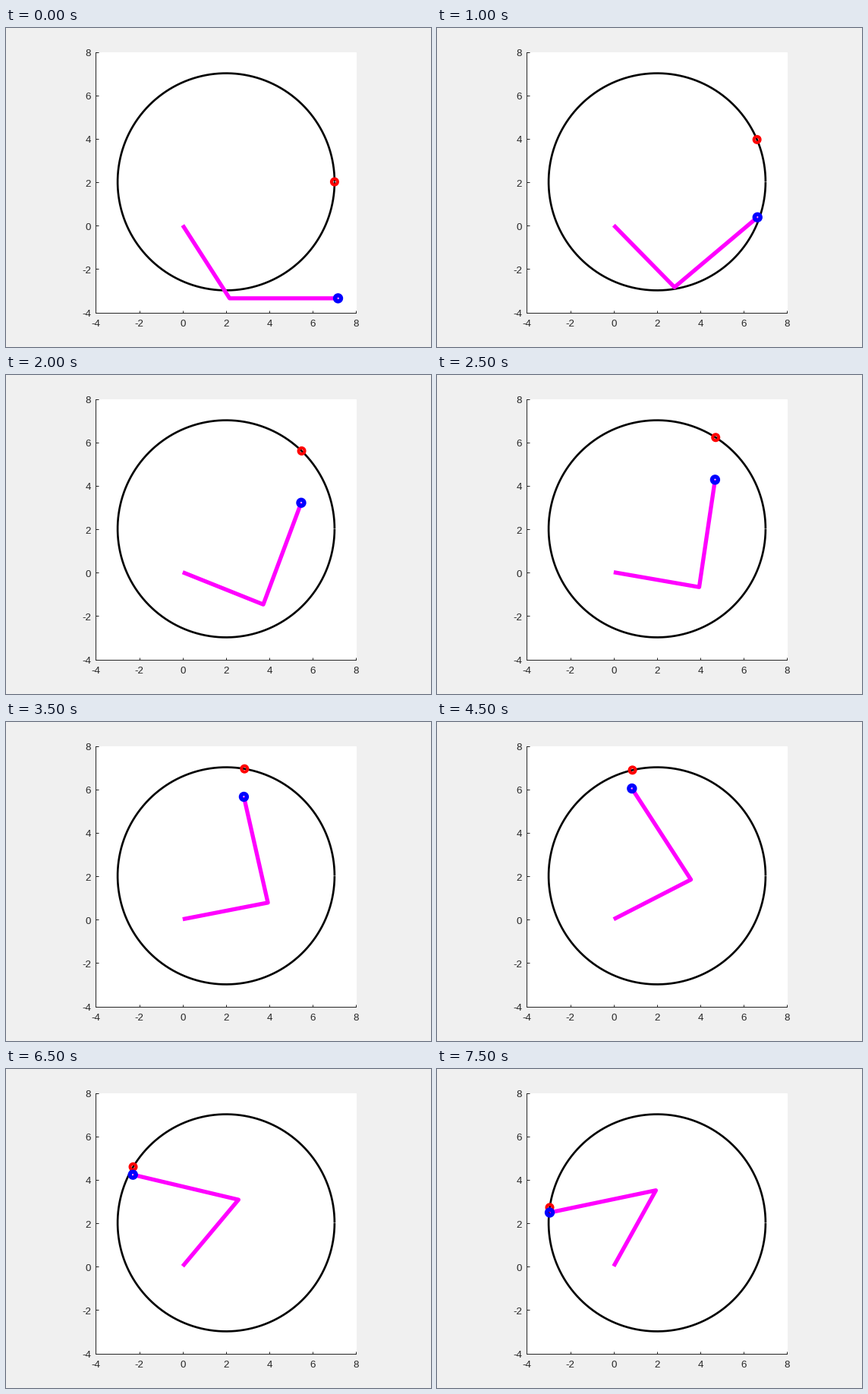
Write a matplotlib script that moves like this. It is 560 px wide and 420 px high and loops after 8 s.

```python
import numpy as np
import matplotlib.pyplot as plt
from matplotlib.animation import FuncAnimation
from matplotlib.transforms import ScaledTranslation

W, H, DPI = 560, 420, 100
PX = 72 / DPI                      # points per pixel
LEFT, BOTTOM, SIDE = 118.49, 45.49, 343
UNIT = SIDE / 12                   # pixels per data unit
FRAMES, INTERVAL = 16, 500
L1, L2 = 4, 5                      # link lengths
DT, SUBSTEPS = 0.05, 4

plt.rcParams["font.family"] = "Liberation Sans"
plt.rcParams["axes.unicode_minus"] = False


def target(t):
    return np.array([2 + 5 * np.cos(t), 2 + 5 * np.sin(t)])


def target_velocity(t):
    return np.array([-5 * np.sin(t), 5 * np.cos(t)])


def arm(q):
    """Elbow and tip of the two-link arm."""
    a, b = q[0], q[0] + q[1]
    elbow = L1 * np.array([np.cos(a), np.sin(a)])
    return elbow, elbow + L2 * np.array([np.cos(b), np.sin(b)])


def jacobian(q):
    elbow, tip = arm(q)
    fore = tip - elbow
    return np.array([[-tip[1], -fore[1]], [tip[0], fore[0]]])


def simulate():
    """Track the target with resolved-rate control, unit gain."""
    q, poses = np.array([-1.0, 1.0]), []
    for k in range(FRAMES * SUBSTEPS):
        if k % SUBSTEPS == 0:
            poses.append(q)
        t = k * DT
        v = target_velocity(t) + target(t) - arm(q)[1]
        q = q + DT * np.linalg.solve(jacobian(q), v)
    return poses


poses = simulate()

fig = plt.figure(figsize=(W / DPI, H / DPI), dpi=DPI, facecolor="#f0f0f0")
ax = fig.add_axes([LEFT / W, BOTTOM / H, SIDE / W, SIDE / H])
ax.set(xlim=(-4, 8), ylim=(-4, 8),
       xticks=range(-4, 9, 2), yticks=range(-4, 9, 2))
ax.patch.set(edgecolor="white", linewidth=PX)
ink = "#262626"
ax.tick_params(direction="in", length=3.5 * PX, width=PX, color=ink,
               labelcolor=ink, labelsize=13.33 * PX)
ax.tick_params(axis="x", pad=9.2 * PX)
ax.tick_params(axis="y", pad=6.5 * PX)
for side, spine in ax.spines.items():
    spine.set(visible=side in ("left", "bottom"), linewidth=PX, color=ink)


def shift_up(pixels):
    return ScaledTranslation(0, pixels / DPI, fig.dpi_scale_trans)


for label in ax.get_yticklabels():
    label.set_transform(label.get_transform() + shift_up(-1))

# Curves sit half a pixel above the axis grid.
plot_space = ax.transData + shift_up(0.5)


def curve(x, y, color, width):
    return ax.plot(x, y, color=color, lw=width * PX, transform=plot_space,
                   solid_capstyle="butt", solid_joinstyle="round")[0]


def ring(color, width):
    circle = plt.Circle((0, 0), 4 / UNIT, fill=False, ec=color,
                        lw=width * PX, zorder=2, clip_on=False)
    ax.add_artist(circle)
    circle.set_transform(plot_space)
    return circle


s = np.arange(0, 2 * np.pi, 0.01)
curve(*target(s), "black", 2.67)
goal = ring("red", 4)
links = curve([], [], "magenta", 5.33)
hand = ring("blue", 5.33)
for z, artist in enumerate((goal, links, hand), 3):
    artist.set_zorder(z)


def draw(i):
    elbow, tip = arm(poses[i])
    goal.center = target(i * DT * SUBSTEPS)
    links.set_data([0, elbow[0], tip[0]], [0, elbow[1], tip[1]])
    hand.center = tip
    return goal, links, hand


anim = FuncAnimation(fig, draw, frames=FRAMES, interval=INTERVAL,
                     repeat=True, repeat_delay=0)
plt.show()
```
